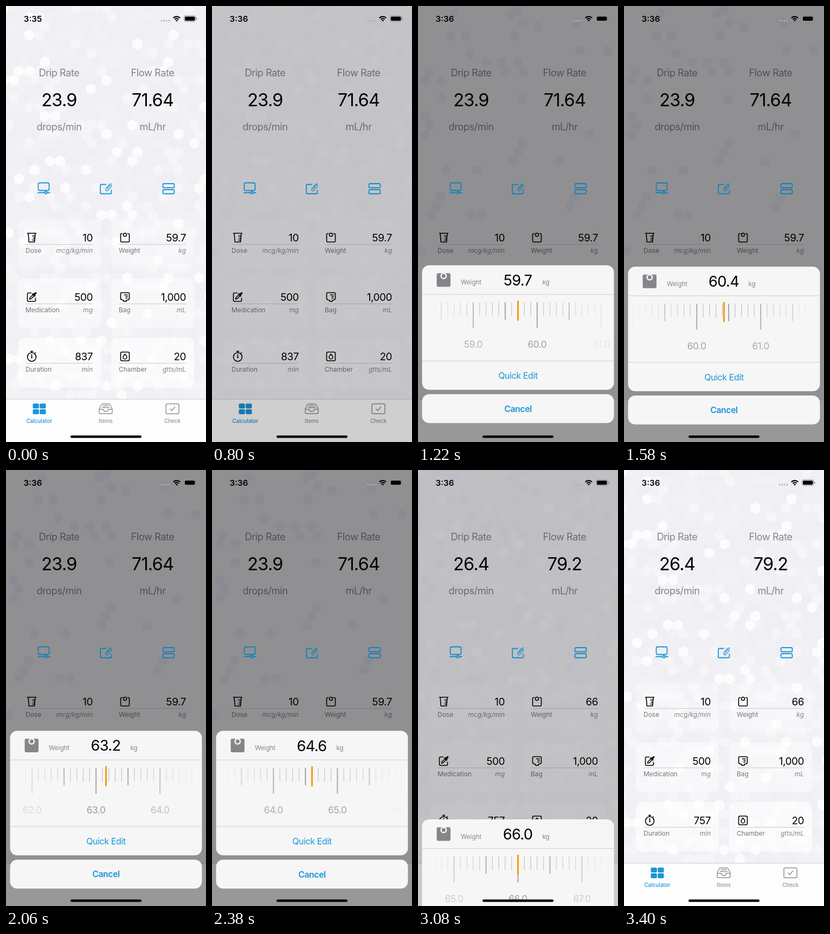
Animation, 369 px wide and 800 px high, one loop 3420 ms. Source, as an HTML page with a canvas:

```html
<!DOCTYPE html>
<html lang="en">
<head>
<meta charset="utf-8">
<title>Drip calculator</title>
<style>
  html, body { margin: 0; width: 100%; height: 100%; overflow: hidden; background: #efeff4; }
  canvas { display: block; width: 369px; height: 800px; }
</style>
</head>
<body>
<canvas id="stage" width="369" height="800"></canvas>
<script>
const W = 369, H = 800, LOOP = 3420;
const ctx = document.getElementById('stage').getContext('2d');
const BLUE = '#1a96d8', GRAY = '#858589', RULE = '#c9c9cd';

const clamp = v => Math.max(0, Math.min(1, v));
const ease = v => v * v * (3 - 2 * v);
const ramp = (t, from, to) => clamp((t - from) / (to - from));

// ---------- timing ----------
const CLOCK_AT = 580, DIM_IN = 610, DIM_FULL = 1015;
const SHEET_IN = 805, SHEET_OUT = 2920, SHEET_GONE = 3240;
const DRAG_START = 1351, RELEASE = 1580, SCROLL_END = 2909;
const FROM = 59.7, RELEASED = 60.42, TO = 66, TRAVEL = 322;

const dimAt = t => ease(ramp(t, DIM_IN, DIM_FULL)) * (1 - ease(ramp(t, SHEET_OUT, SHEET_GONE)));

function sheetOffset(t) {
  if (t < SHEET_IN || t >= SHEET_GONE) return TRAVEL;
  if (t > SHEET_OUT) return TRAVEL * ease(ramp(t, SHEET_OUT, SHEET_GONE));
  const s = (t - SHEET_IN) / 1000, w = Math.PI / 0.26, decay = 9.5;
  return TRAVEL * Math.exp(-decay * s) * (Math.cos(w * s) + decay / w * Math.sin(w * s));
}

// The drag speeds up evenly, then the ruler coasts to a stop.
function weightAt(t) {
  if (t < RELEASE) return FROM + (RELEASED - FROM) * ramp(t, DRAG_START, RELEASE) ** 2;
  return TO - (TO - RELEASED) * (1 - ramp(t, RELEASE, SCROLL_END)) ** 1.5;
}

// ---------- drawing helpers ----------
function text(str, x, y, size, { color = '#000', weight = 400, align = 'left', italic = false, track = size > 15.5 ? -0.025 : 0 } = {}) {
  ctx.font = `${italic ? 'italic ' : ''}${weight} ${size}px Inter, sans-serif`;
  ctx.letterSpacing = `${track * size}px`;
  ctx.textAlign = align;
  ctx.fillStyle = color;
  ctx.fillText(str, x, y);
}

function box(x, y, w, h, r, fill) {
  ctx.beginPath();
  ctx.roundRect(x, y, w, h, r);
  if (fill) { ctx.fillStyle = fill; ctx.fill(); } else ctx.stroke();
}

function disc(x, y, r, fill) {
  ctx.beginPath();
  ctx.arc(x, y, r, 0, 7);
  if (fill) { ctx.fillStyle = fill; ctx.fill(); } else ctx.stroke();
}

function pen(color, width) {
  ctx.strokeStyle = color;
  ctx.lineWidth = width;
  ctx.lineCap = ctx.lineJoin = 'round';
}

const path = d => ctx.stroke(new Path2D(d));

function rule(x, y, w, color = RULE) {
  ctx.fillStyle = color;
  ctx.fillRect(x, y, w, 1);
}

function at(x, y, draw) {
  ctx.save();
  ctx.translate(x, y);
  draw();
  ctx.restore();
}

// ---------- honeycomb ----------
function addHex(p, x, y, r = 10.6) {
  for (let i = 0; i < 6; i++) {
    const a = Math.PI / 3 * i + Math.PI / 6;
    p[i ? 'lineTo' : 'moveTo'](x + r * Math.cos(a), y + r * Math.sin(a));
  }
  p.closePath();
}

let seed = 71;
const random = () => (seed = seed * 16807 % 2147483647) / 2147483647;
const combs = [[0.18, new Path2D()], [0.4, new Path2D()], [0.85, new Path2D()]];
for (let row = 0; row < 46; row++) {
  const y = 4 + row * 16.5, dense = y > 380 ? 1.6 : 1;
  for (let x = row % 2 ? 5 : -4.5; x < W + 10; x += 19) {
    const n = random() / dense;
    const level = n < 0.07 ? 2 : n < 0.23 ? 1 : n < 0.47 ? 0 : -1;
    if (level >= 0) addHex(combs[level][1], x, y);
  }
}

const shade = new Path2D();
[[67, 14], [172, 14], [185, 8], [194, 31], [221, 38], [294, 31], [60, 54], [87, 54], [177, 54], [299, 81],
 [350, 82], [96, 88], [126, 103], [154, 103], [184, 103], [20, 120], [162, 120], [194, 120], [14, 137], [43, 137],
 [43, 170], [192, 170], [14, 203], [23, 219], [14, 236], [316, 236], [193, 252], [184, 268], [176, 285], [260, 285],
 [52, 301], [109, 301], [289, 350], [280, 367], [42, 350], [33, 367], [24, 383], [99, 383], [118, 383], [5, 449]
].forEach(([x, y]) => addHex(shade, x, y, 10));

function drawBackground(dim) {
  ctx.fillStyle = '#efeff4';
  ctx.fillRect(0, 0, W, H);
  const glow = (1 - dim) ** 2;
  ctx.fillStyle = '#fff';
  for (const [alpha, comb] of combs) {
    ctx.globalAlpha = alpha * glow;
    ctx.fill(comb);
  }
  [0.3, 0.45, 0.65].forEach((alpha, row) => {
    ctx.globalAlpha = alpha * glow;
    for (const x of [22, 194]) box(x, 391 + row * 109, 153, 91, 10, '#fff');
  });
  ctx.globalAlpha = dim;
  ctx.fillStyle = '#e6e6f1';
  ctx.fill(shade);
  ctx.globalAlpha = 1;
}

// ---------- card icons, each about 18 px around its centre ----------
const icons = {
  beaker() {
    path('M-8-8H8M-6.5-8L-5.2 8H5.2L6.5-8M1.5-3H5.5M2.5 1H5M1.5 4.5H5');
  },
  scale() {
    path('M-5-7.5H-6Q-8-7.5-8-5.5V6Q-8 8-6 8H6Q8 8 8 6V-5.5Q8-7.5 6-7.5H5');
    disc(0, -5.2, 3);
  },
  dropper() {
    path('M-1-7.5H-6Q-8-7.5-8-5.5V6Q-8 8-6 8H5Q7 8 7 6V2M-4 4L-3.2 1L3-5M-4 4L-1 3.2L5-3');
    pen('#000', 3.4);
    path('M4-4L7.2-7.2M2.5-5.2L5.2-2.5');
  },
  bag() {
    path('M-6-8H6Q8-8 8-6V2Q8 5 5 5.5L2.5 6V8H-2.5V6L-5 5.5Q-8 5-8 2V-6Q-8-8-6-8ZM-1-4H4.5M1.5-1H4.5M1.5 2H4');
  },
  timer() {
    disc(0, 1, 8);
    path('M-2-9.4H2M0-8V-7M0 2V-3.5M6-6L7-7');
    disc(0, 2, 1.3, '#000');
  },
  drop() {
    box(-8, -8, 16, 16, 2.5);
    path('M0-4.5Q3.4-.6 3.4 1.4A3.4 3.4 0 0 1-3.4 1.4Q-3.4-.6 0-4.5Z');
  }
};

function drawCards(done) {
  const cards = [
    ['beaker', '10', 'Dose', 'mcg/kg/min'], ['scale', done ? '66' : '59.7', 'Weight', 'kg'],
    ['dropper', '500', 'Medication', 'mg'], ['bag', '1,000', 'Bag', 'mL'],
    ['timer', done ? '757' : '837', 'Duration', 'min'], ['drop', '20', 'Chamber', 'gtts/mL']
  ];
  cards.forEach(([icon, value, label, unit], i) => {
    at(i % 2 ? 208 : 36, 425 + (i >> 1) * 109, () => {
      pen('#000', 1.6);
      at(11.5, 0, icons[icon]);
      text(value, 124, 7, 19, { align: 'right' });
      rule(0, 12, 124);
      text(label, 0, 27.5, 12, { color: '#77777b' });
      text(unit, 124, 27.5, 12, { color: GRAY, align: 'right', italic: true });
    });
  });
}

function drawRates(done) {
  const rates = [
    [98, 'Drip Rate', done ? '26.4' : '23.9', 'drops/min'],
    [270.5, 'Flow Rate', done ? '79.2' : '71.64', 'mL/hr']
  ];
  for (const [x, title, value, unit] of rates) {
    const soft = { color: GRAY, align: 'center' };
    text(title, x, 129, 18.2, soft);
    text(value, x, 184, 32.6, { align: 'center' });
    text(unit, x, 228, 18.2, soft);
  }
}

function drawStatusBar(t) {
  text(t < CLOCK_AT ? '3:35' : '3:36', 49.5, 29, 15.2, { weight: 600, align: 'center' });
  for (let i = 0; i < 4; i++) disc(287.5 + i * 4.5, 27, 1.4, '#b0b0b3');
  pen('#000', 2.2);
  ctx.lineCap = 'butt';
  for (const r of [4.8, 8.6]) {
    ctx.beginPath();
    ctx.arc(315, 28, r, -Math.PI * 0.76, -Math.PI * 0.24);
    ctx.stroke();
  }
  ctx.beginPath();
  ctx.moveTo(315, 28.6);
  ctx.arc(315, 28.6, 3, -Math.PI * 0.76, -Math.PI * 0.24);
  ctx.fillStyle = '#000';
  ctx.fill();
  pen('#8e8e92', 1);
  box(328.5, 18, 21.5, 10.5, 3);
  box(330, 19.5, 18.5, 7.5, 1.8, '#000');
  box(351, 21.3, 1.5, 4, 0.8, '#8e8e92');
}

function drawActions(dim) {
  pen(`rgb(${26 - 6 * dim}, ${150 - 22 * dim}, ${216 - 36 * dim})`, 1.8);
  box(59.5, 324.5, 20, 14, 2.5);
  path('M59 342.5H71M76 342.5H81');
  disc(73.5, 342.5, 2.1);
  path('M184 327.5H176Q174 327.5 174 329.5V342.5Q174 344.5 176 344.5H192.5Q194.5 344.5 194.5 342.5V338');
  ctx.lineWidth = 1.2;
  path('M186.5 335.5L191.5 329.5Q193.2 328 194.2 329.3Q195 330.4 194 331.7L188.3 338.3Q186 340.2 184.5 338.5Q183 336.8 184.7 334.6L190.5 327.7Q192.8 325.4 195 326.8');
  ctx.lineWidth = 1.8;
  for (const y of [326, 337]) box(289.5, y, 21, 7.5, 2);
}

function drawTabBar() {
  ctx.fillStyle = '#fdfdfe';
  ctx.fillRect(0, 721, W, 79);
  rule(0, 721, W, '#cfcfd3');
  for (const x of [49.5, 62.2]) for (const y of [729.5, 740]) box(x, y, 11.3, 9, 1.8, BLUE);
  pen('#929296', 1.5);
  path('M172 739.5L176 731.5Q176.6 730.2 178 730.2H190Q191.4 730.2 192 731.5L196 739.5V745.5Q196 748 193.5 748H174.5Q172 748 172 745.5ZM172 740H179Q180 744 184 744Q188 744 189 740H196M179 733.5H189M177.5 736.8H190.5');
  box(295, 730, 24, 18.3, 2.5);
  path('M303 739.5L306 742.5L311.5 735.5');
  const tabs = [[61.3, 'Calculator', BLUE], [184, 'Items', '#929296'], [307, 'Check', '#929296']];
  for (const [x, label, color] of tabs) text(label, x, 764.5, 9.8, { color, weight: 500, align: 'center' });
}

// ---------- picker sheet ----------
function drawRuler(value) {
  const centre = 184.5, unit = 118, first = Math.floor(value * 10) - 16;
  ctx.save();
  ctx.beginPath();
  ctx.rect(14, 54, 340, 120);
  ctx.clip();
  for (let n = first; n < first + 34; n++) {
    const x = centre + (n / 10 - value) * unit, d = Math.abs(x - centre);
    if (d > 180) continue;
    const major = n % 10 === 0, strong = n % 5 === 0;
    ctx.globalAlpha = Math.max(0.04, Math.cos(Math.min(1, d / 170) * Math.PI / 2));
    ctx.fillStyle = strong ? '#a4a4a9' : '#c3c3c8';
    const w = strong ? 2 : 1.2;
    ctx.fillRect(x - w / 2, 68, w, major ? 47.5 : strong ? 32 : 25);
    if (major) text((n / 10).toFixed(1), x, 151.5, 17.2, { color: '#99999e', align: 'center' });
  }
  ctx.restore();
  box(183, 64.5, 3, 37.5, 1.5, '#f59a11');
}

function drawSheet(value) {
  box(7.5, 0, 354, 228.5, 13, '#f6f6f6');
  box(7.5, 236.5, 354, 53, 13, '#f6f6f6');
  box(34.5, 14.5, 25.5, 25, 3, '#85858a');
  pen('#f6f6f6', 2.5);
  disc(47.3, 19.5, 4.8);
  text('Weight', 79, 35.5, 11.6, { color: GRAY });
  text(value.toFixed(1), 184, 37, 27.3, { align: 'center' });
  text('kg', 229.5, 35.5, 11.6, { color: GRAY });
  rule(7.5, 53, 354, '#cfcfd2');
  drawRuler(value);
  rule(7.5, 175, 354, '#cfcfd2');
  text('Quick Edit', 184.5, 208.5, 16, { color: BLUE, align: 'center' });
  text('Cancel', 184.5, 269, 15.8, { color: BLUE, weight: 600, align: 'center' });
}

function draw(t) {
  const dim = dimAt(t), done = t >= SHEET_OUT, offset = sheetOffset(t);
  drawBackground(dim);
  drawRates(done);
  drawCards(done);
  drawTabBar();
  ctx.fillStyle = `rgba(0, 0, 0, ${0.4 * dim})`;
  ctx.fillRect(0, 0, W, H);
  drawActions(dim);
  drawStatusBar(t);
  if (offset < TRAVEL) at(0, 478.5 + offset, () => drawSheet(weightAt(t)));
  box(119, 788, 131, 4.6, 2.3, '#000');
}

const start = performance.now();
function tick() {
  draw((performance.now() - start) % LOOP);
  requestAnimationFrame(tick);
}
tick();
</script>
</body>
</html>
```
